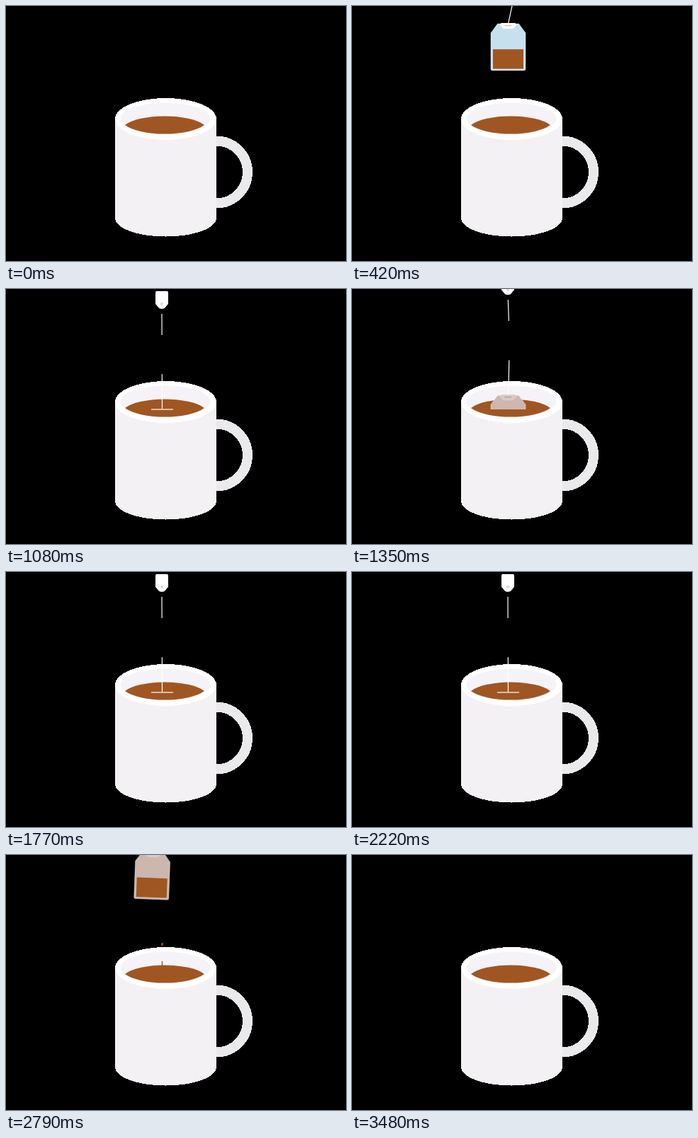
Write an HTML page that moves like this. It is 480 px wide and 360 px high and loops after 3600 ms.

```html
<!DOCTYPE html>
<html lang="en">
<head>
<meta charset="utf-8">
<title>Tea bag</title>
<style>
html, body { margin: 0; width: 100%; height: 100%; overflow: hidden; background: #000; }
svg { display: block; width: 100%; height: 100%; }
</style>
</head>
<body>
<svg viewBox="0 0 480 360">
  <defs>
    <clipPath id="above"><rect width="480" height="170"/></clipPath>
  </defs>
  <rect width="480" height="360"/>

  <!-- mug -->
  <g shape-rendering="crispEdges">
    <path d="M297 190.500A44 44 0 0 1 297 278.500" fill="none" stroke="#eae9ec" stroke-width="14"/>
    <path d="M154 159.500V299.500A71.500 26 0 0 0 297 299.500V159.500Z" fill="#f3f1f4"/>
    <ellipse cx="225.500" cy="159.500" rx="71.500" ry="29.500" fill="#fff"/>
  </g>
  <ellipse cx="225" cy="159" rx="63.500" ry="22.500" fill="#f5f3f7"/>
  <path d="M168 168A62 22 0 0 1 280 168A62 22 0 0 1 168 168Z" fill="#a05622"/>

  <!-- string and tag -->
  <path id="string" fill="none" stroke="#fff" stroke-width="1.200" pathLength="100" stroke-dasharray="0 5 21 39 35 0"/>
  <g id="tag">
    <path d="M-8 -25H8L9 -23V-7L4 -1Q0 1 -4 -1L-9 -7V-23Z" fill="#fff"/>
    <circle cy="-7" r="2" fill="#dcd6da"/>
  </g>

  <g id="drops" fill="#a05622"></g>

  <!-- bag, cut off at the tea surface -->
  <g clip-path="url(#above)">
    <g id="bag">
      <path id="paper" d="M-15 2H15L24.500 15V66Q24.500 68 22.500 68H-22.500Q-24.500 68 -24.500 66V15Z" stroke="#fff" stroke-opacity=".4"/>
      <rect x="-21.500" y="38" width="43" height="27.500" fill="#a05622"/>
      <path id="flap" d="M-10 1H10L12 4L7 9H-7L-12 4Z"/>
      <path d="M-5 4.500H5" stroke="#8a5a3c" stroke-opacity=".4" stroke-width="1.300"/>
    </g>
  </g>
  <rect id="ripple" x="205" y="169" width="31" height="2" fill="#d9bba8"/>
</svg>
<script>
const LOOP = 3600, STEP = 30;
const TOP = -72, DEPTH = 168, STRING = 140, SURFACE = 170;
const DRY = [198, 224, 239], WET = [204, 183, 175];
const WHITE = [255, 255, 255], DAMP = [217, 202, 196];

const $ = id => document.getElementById(id);
const set = (el, name, value) => el.setAttribute(name, value);
const show = (el, on) => set(el, "visibility", on ? "visible" : "hidden");

const progress = (t, from, to) => Math.min(1, Math.max(0, (t - from) / (to - from)));
const smooth = u => u * u * (3 - 2 * u);
const mix = (a, b, u) => `rgb(${a.map((v, i) => Math.round(v + (b[i] - v) * u))})`;

const drops = [0, 1].map(i => {
  const el = document.createElementNS("http://www.w3.org/2000/svg", "rect");
  const width = 1.4 + i, len = 9 - 5 * i;
  set(el, "x", 220.5 - width / 2);
  set(el, "width", width);
  set(el, "height", len);
  set(el, "rx", 0.7);
  $("drops").append(el);
  return { el, len, start: 2640 + 50 * i, y: 134 - 17 * i };
});

function draw(time) {
  const t = Math.floor(time % LOOP / STEP) * STEP;

  // Share of the way still to sink, one bob, then the lift
  const left = (1 - progress(t, 240, 870)) ** 1.5;
  const bob = Math.sin(Math.PI * progress(t, 1140, 1740)) ** 2;
  const lift = progress(t, 2280, 3060);
  const slack = 14 * Math.exp(-(((t - 780) / 120) ** 2));

  const y = DEPTH - (DEPTH - TOP) * (left + smooth(lift)) - 25 * bob;
  const x = 220.5 - 30 * lift ** 2;
  const tagX = x - 0.5 + 86 * left ** 2;
  const tagY = y - STRING + slack;
  const end = Math.min(y + 2, SURFACE);

  set($("bag"), "transform", `translate(${x} ${y}) rotate(${5 * lift ** 2})`);
  set($("paper"), "fill", mix(DRY, WET, smooth(progress(t, 420, 780))));
  set($("flap"), "fill", mix(WHITE, DAMP, progress(t, 780, 1350)));
  set($("tag"), "transform", `translate(${tagX} ${tagY})`);
  set($("string"), "d", `M${tagX} ${tagY}Q${(tagX + x) / 2 + 4 * bob} ${(tagY + end) / 2} ${x} ${end}`);
  show($("ripple"), y > DEPTH - 1);

  for (const { el, len, start, y } of drops) {
    const age = t - start, top = y + 0.0007 * age * age;
    set(el, "y", top);
    show(el, age >= 0 && top + len < SURFACE);
  }
}

let begin;
function tick(now) {
  begin ??= now;
  draw(now - begin);
  requestAnimationFrame(tick);
}
draw(0);
requestAnimationFrame(tick);
</script>
</body>
</html>
```
